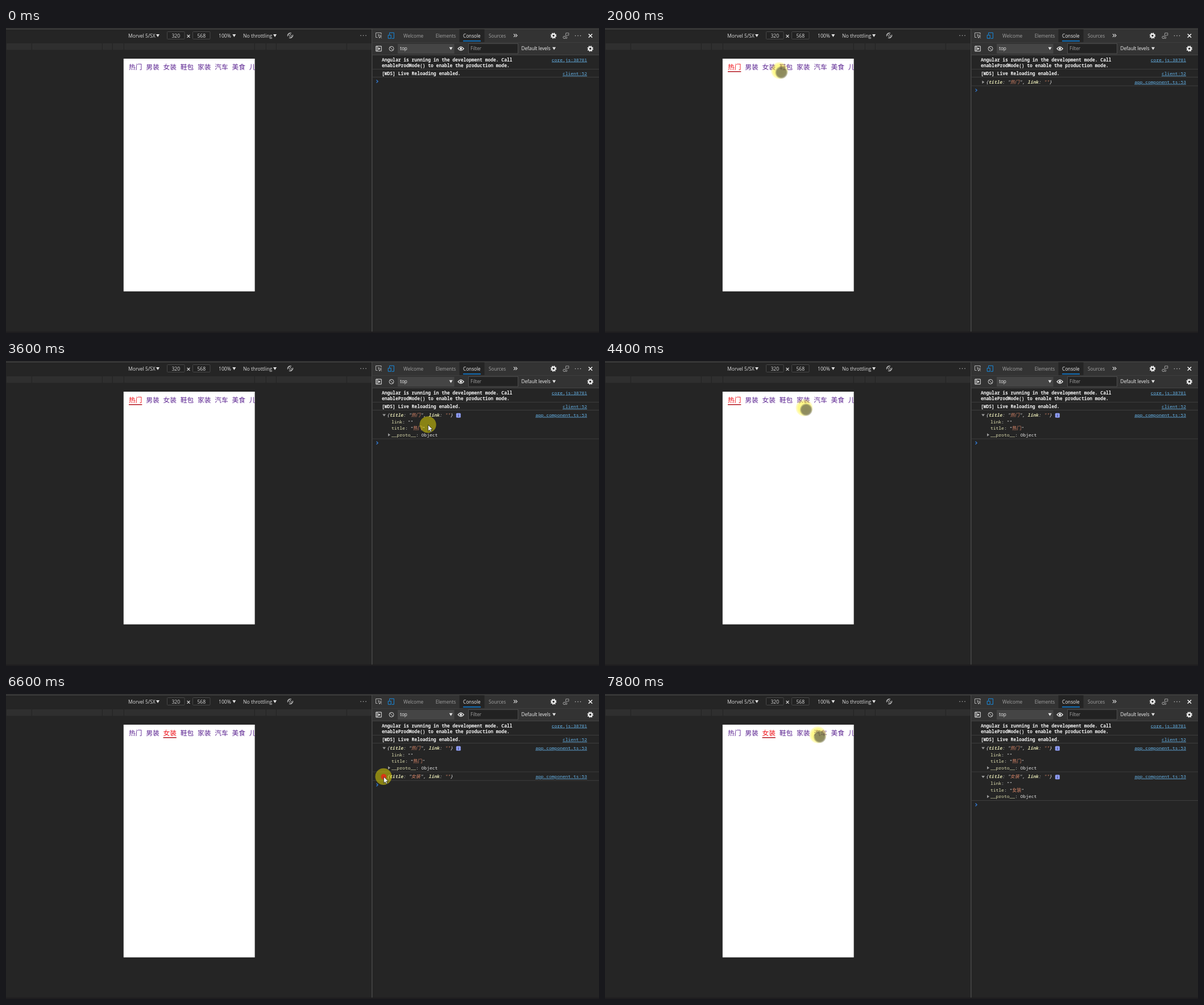
An HTML page that plays this animation: 1043x537 px, repeating every 8 s.

```html
<!DOCTYPE html>
<html lang="en">
<head>
<meta charset="utf-8">
<title>Console demo</title>
<style>
html, body { margin: 0; width: 100%; height: 100%; overflow: hidden; background: #252525; }
svg { display: block; width: 100vw; height: 100vh; }
text { white-space: pre; }
.ui { font: 8.2px "Open Sans", "Noto Sans", sans-serif; fill: #f0f0f0; }
.bar { font-size: 8.6px; fill: #dcdcdc; }
.dim { fill: #a3a3a3; }
.mono { font: 500 7.97px "Noto Sans Mono", "Noto Sans CJK SC", "Noto Sans CJK", monospace; fill: #e8e8e8; }
.msg { font-weight: 700; fill: #f4f4f4; }
.link { fill: #66b4ea; text-decoration: underline; }
.sum { font-style: italic; }
.key { fill: #dfdfb0; }
.sum .key { font-weight: 700; }
.str { fill: #de8a6c; }
.sep { fill: #3d3d3d; }
.nav { font: 11.65px "Noto Sans CJK SC", "Noto Sans CJK", sans-serif; fill: #5a2290; }
.ico { fill: none; stroke: #d6d6d6; stroke-width: 1; }
</style>
</head>
<body>
<svg id="stage" viewBox="0 0 1043 537" preserveAspectRatio="none">
  <defs>
    <clipPath id="page"><rect x="207" y="54" width="230.6" height="410"/></clipPath>
    <radialGradient id="dot">
      <stop offset="0" stop-color="#3a3a3a" stop-opacity=".58"/>
      <stop offset=".76" stop-color="#3a3a3a" stop-opacity=".56"/>
      <stop offset=".86" stop-color="#3a3a3a" stop-opacity=".36"/>
      <stop offset="1" stop-color="#3a3a3a" stop-opacity=".16"/>
    </radialGradient>
    <radialGradient id="glow">
      <stop offset=".7" stop-color="#fff200" stop-opacity=".46"/>
      <stop offset="1" stop-color="#fff200" stop-opacity=".14"/>
    </radialGradient>
  </defs>
</svg>
<script>
const NS = "http://www.w3.org/2000/svg";
const stage = document.getElementById("stage");
const STEP = 200, LOOP = 8000;

function add(parent, tag, attrs = {}, label) {
  const el = document.createElementNS(NS, tag);
  for (const k in attrs) el.setAttribute(k, attrs[k]);
  if (label !== undefined) el.textContent = label;
  parent.appendChild(el);
  return el;
}
const rect = (x, y, width, height, fill, more) =>
  add(stage, "rect", { x, y, width, height, fill, ...more });
const path = (d, more) => add(stage, "path", { d, class: "ico", ...more });
const text = (parent, x, y, label, cls, more) =>
  add(parent, "text", { x, y, class: cls, ...more }, label);
const caret = (x, y, fill = "#e4e4e4") =>
  add(stage, "path", { d: `M${x - 3} ${y - 2.3}h6l-3 5z`, fill });
const circle = (parent, cx, cy, r, more) => add(parent, "circle", { cx, cy, r, ...more });
const show = (el, on) => el.setAttribute("display", on ? "inline" : "none");

function ban(x, y, r) {
  circle(stage, x, y, r, { class: "ico" });
  path(`M${x - r * .7} ${y - r * .7}l${r * 1.4} ${r * 1.4}`);
}
function dots(x, y) {
  for (const d of [-4.5, 0, 4.5]) circle(stage, x + d, y, .8, { fill: "#b8b8b8" });
}
function gear(x, y) {
  circle(stage, x, y, 2.9, { class: "ico", style: "stroke:#f2f2f2;stroke-width:2.2" });
  circle(stage, x, y, 4.5, {
    class: "ico", style: "stroke:#f2f2f2;stroke-width:1.6", "stroke-dasharray": "1.77 1.77"
  });
}

// device toolbar
function drawToolbar() {
  rect(0, 0, 1043, 537, "#252525");
  rect(0, 0, 1043, 1, "#202020");
  rect(0, 1, 1043, 1.2, "#4c4c4c");
  const y = 16.6;
  text(stage, 215, y, "Morvel 5/SX", "ui bar");
  caret(267, 13.3);
  for (const [x, n] of [[283.5, "320"], [328.5, "568"]]) {
    rect(x, 6.5, 30.5, 13, "#222", { stroke: "#484848", rx: 1 });
    text(stage, x + 15.3, y, n, "ui bar", { "text-anchor": "middle" });
  }
  path("M318.6 12l4.8 4.8M323.4 12l-4.8 4.8", { style: "stroke-width:1.2" });
  text(stage, 374, y, "100%", "ui bar");
  caret(401.3, 13.3);
  text(stage, 417, y, "No throttling", "ui bar");
  caret(473, 13.3);
  // rotate icon: two arcs around a tilted screen
  path("M495.4 14.6a4.6 4.6 0 0 1 6.6-5.4M504.4 11.8a4.6 4.6 0 0 1-6.6 5.4");
  path("M496.6 11.6l2-2 4.6 5.2-2 2z");
  dots(628.5, 13.3);
  const cuts = [0, 45, 169, 187, 207, 437, 457, 475, 599, 643];
  for (let i = 1; i < cuts.length; i++)
    rect(cuts[i - 1] + 1, 27, cuts[i] - cuts[i - 1] - 1.2, 11.5, "#2f2f2f");
  rect(206.8, 54, 230.8, 409.7, "#fff");
}

// tools panel header
function drawPanel() {
  rect(643, 2, 1.5, 535, "#484848");
  rect(644.5, 2, 398.5, 45, "#333");
  rect(797.5, 2, 44, 23, "#242424");
  rect(644.5, 25, 398.5, 1, "#3d3d3d");
  rect(804, 22, 31, 1.6, "#0e7fd8");
  rect(644.5, 47, 398.5, 1, "#444");
  path("M653.5 16.5h-3v-8h9.5v3.2M654.5 11.5l6.2 2.7-2.6 1-1.1 2.6zM658.2 15.2l2.6 2.7", { style: "stroke:#c0c0c0;stroke-width:.9" });
  path("M674.5 11.5v-3.2h7.8v10h-3.8M672.2 12.5h5v5.8h-5z", { style: "stroke:#168be2" });
  const tabs = [[699, "Welcome"], [755.8, "Elements"], [804, "Console"], [849, "Sources"]];
  for (const [x, s] of tabs) text(stage, x, 16.5, s, s === "Console" ? "ui" : "ui dim");
  path("M893 10.5l2.7 2.7-2.7 2.7M896.3 10.5l2.7 2.7-2.7 2.7", { style: "stroke-width:1.2" });
  gear(963, 13.6);
  circle(stage, 982, 16.5, 2.1, { class: "ico", style: "stroke:#aaa" });
  path("M984.8 8.8h5v4h-3l-1.8 1.8v-1.8h-.8zM984 18.2h2.5v-3", { style: "stroke:#aaa;stroke-width:.9" });
  dots(1006, 13.6);
  path("M1024.7 10.4l6.4 6.4M1031.1 10.4l-6.4 6.4", { style: "stroke:#fff;stroke-width:1.4" });

  path("M650.8 32h9.4v8.8h-9.4zM653 32v8.8", { style: "stroke:#eee" });
  add(stage, "path", { d: "M654.8 34v5l3.8-2.5z", fill: "#eee" });
  ban(678, 36.4, 4);
  rect(689, 28, 99.5, 17, "#454545");
  text(stage, 693, 39.4, "top", "ui");
  caret(782.5, 36);
  path("M795 36.4q5-6.6 10.2 0q-5.2 6.6-10.2 0z", { style: "stroke:#f2f2f2;stroke-width:1.3" });
  circle(stage, 800.1, 36.4, 1.9, { fill: "#f2f2f2" });
  rect(813.5, 27.5, 87, 17.5, "#222", { stroke: "#4c4c4c" });
  text(stage, 817, 39.4, "Filter", "ui dim");
  text(stage, 906.5, 39.4, "Default levels", "ui");
  caret(964, 36);
  gear(1027.7, 36.4);
}

const sep = (parent, y) =>
  add(parent, "rect", { x: 645, y, width: 398, height: 1, class: "sep" });
const link = (parent, y, s) =>
  text(parent, 1022, y, s, "mono link", { "text-anchor": "end" });

function spans(parent, x, y, cls, parts) {
  const t = text(parent, x, y, "", cls);
  for (const [s, c] of parts) add(t, "tspan", { class: c || "" }, s);
}

function drawMessages() {
  text(stage, 661, 58.6, "Angular is running in the development mode. Call", "mono msg");
  text(stage, 661, 68.6, "enableProdMode() to enable the production mode.", "mono msg");
  link(stage, 58.6, "core.js:38781");
  sep(stage, 72);
  text(stage, 661, 83, "[WDS] Live Reloading enabled.", "mono msg");
  link(stage, 83, "client:52");
  sep(stage, 86);
}

// a logged object that can be opened; y is the middle of its first line
function logEntry(title, y) {
  const g = add(stage, "g"), closed = add(g, "g"), open = add(g, "g");
  const mark = { fill: "#9a9a9a" };
  spans(g, 669.8, y + 2.9, "mono sum", [
    ["{"], ["title", "key"], [": "], ['"'], [title, "str"], ['", '],
    ["link", "key"], [": "], ['""', "str"], ["}"]
  ]);
  link(g, y + 2.7, "app.component.ts:53");
  add(closed, "path", { d: `M663.3 ${y - 2.6}v5.6l4-2.8z`, ...mark });
  sep(closed, y + 6.3);
  add(open, "path", { d: `M662.2 ${y - 1.5}h5.8l-2.9 4z`, ...mark });
  add(open, "rect", { x: 791.8, y: y - 3.3, width: 8, height: 8, rx: 1.5, fill: "#8f9df2" });
  add(open, "path", { d: `M795.8 ${y - 1.6}v1M795.8 ${y + .2}v2.9`, stroke: "#28306e", "stroke-width": 1.1 });
  spans(open, 678, y + 14.5, "mono", [["link", "key"], [': ""']]);
  spans(open, 678, y + 26.1, "mono", [["title", "key"], [': "'], [title, "str"], ['"']]);
  spans(open, 678, y + 37.8, "mono", [["__proto__", "key"], [": Object"]]);
  add(open, "path", { d: `M672 ${y + 32.2}v5.6l4-2.8z`, ...mark });
  sep(open, y + 41.5);
  return (on, wide) => { show(g, on); show(closed, !wide); show(open, wide); };
}

drawToolbar();
drawPanel();
drawMessages();
const logs = [logEntry("热门", 95), logEntry("女装", 145.5)];
const prompt = path("M651.5 -2.5l2.7 2.5-2.7 2.5", { style: "stroke:#337fdc;stroke-width:1.2" });
rect(0, 534.5, 1043, 2.5, "#1e1d1f");

const nav = add(stage, "g", { "clip-path": "url(#page)" });
const items = ["热门", "男装", "女装", "鞋包", "家装", "汽车", "美食", "儿童"].map((s, i) =>
  text(nav, 216 + i * 30.25, 72.9, s, "nav"));
const line = add(nav, "rect", { y: 76, width: 23.3, height: 1.5, fill: "#b3141e" });

// pointer: yellow halo with an arrow, or a touch dot over the page
const pointer = add(stage, "g");
const halo = circle(pointer, 0, 0, 14.6, { fill: "#fff200", "fill-opacity": .46 });
const glow = circle(pointer, .5, .5, 15, { fill: "url(#glow)" });
const press = circle(pointer, .3, .3, 4.8, { fill: "#e32a14", "fill-opacity": .88 });
const touch = circle(pointer, 3.8, 3.8, 11, { fill: "url(#dot)" });
const arrow = add(pointer, "path", {
  d: "M.4 .4V11.6L3 9.2 4.8 13 6.6 12.2 4.9 8.4H8.4Z",
  fill: "#fff", stroke: "#111", "stroke-width": .7
});

// time, x, y of the halo centre
const route = [
  [200, 1030, 524], [400, 800, 330], [600, 480, 160], [800, 250, 88], [1000, 224.5, 72.5],
  [1400, 224.5, 72.5], [1600, 231, 74], [2000, 306.5, 74.5], [2200, 490, 88], [2400, 663, 94],
  [2800, 664, 94], [3200, 706, 104], [3600, 742, 112], [3800, 728, 124], [4000, 630, 144],
  [4200, 480, 118], [4400, 350, 82], [4600, 292, 69], [4800, 288, 67], [5400, 288, 69],
  [5600, 385, 92], [5800, 545, 136], [6000, 661, 152], [6200, 664, 146], [6800, 664, 145],
  [7000, 708, 162], [7200, 737, 176], [7400, 560, 130], [7600, 348, 77], [7800, 374, 71.5]
];

function place(t) {
  const i = route.findIndex(p => p[0] > t);
  if (i < 0) return route[route.length - 1].slice(1);
  const [t0, x0, y0] = route[i - 1], [t1, x1, y1] = route[i];
  const k = (t - t0) / (t1 - t0);
  return [x0 + (x1 - x0) * k, y0 + (y1 - y0) * k];
}

function draw(t) {
  const one = t >= 1400, oneOpen = t >= 2800, two = t >= 5000, twoOpen = t >= 6800;
  logs[0](one, oneOpen);
  logs[1](two, twoOpen);
  const py = twoOpen ? 195 : two ? 160 : oneOpen ? 144.3 : one ? 109.6 : 94;
  prompt.setAttribute("transform", `translate(0 ${py})`);

  const chosen = two ? 2 : one ? 0 : -1;
  items.forEach((el, i) => { el.style.fill = i === chosen ? "#f00a12" : ""; });
  show(line, chosen >= 0);
  line.setAttribute("x", 216 + Math.max(chosen, 0) * 30.25);

  show(pointer, t >= 200);
  if (t < 200) return;
  const [x, y] = place(t);
  const inPage = x > 207 && x < 438 && y > 54 && y < 464;
  pointer.setAttribute("transform", `translate(${x} ${y})`);
  for (const el of [glow, touch]) show(el, inPage);
  for (const el of [halo, arrow]) show(el, !inPage);
  show(press, t === 2600 || t === 6600);
}

const start = performance.now();
function tick() {
  const t = (performance.now() - start) % LOOP;
  draw(Math.floor(t / STEP) * STEP);
  requestAnimationFrame(tick);
}
tick();
</script>
</body>
</html>
```
